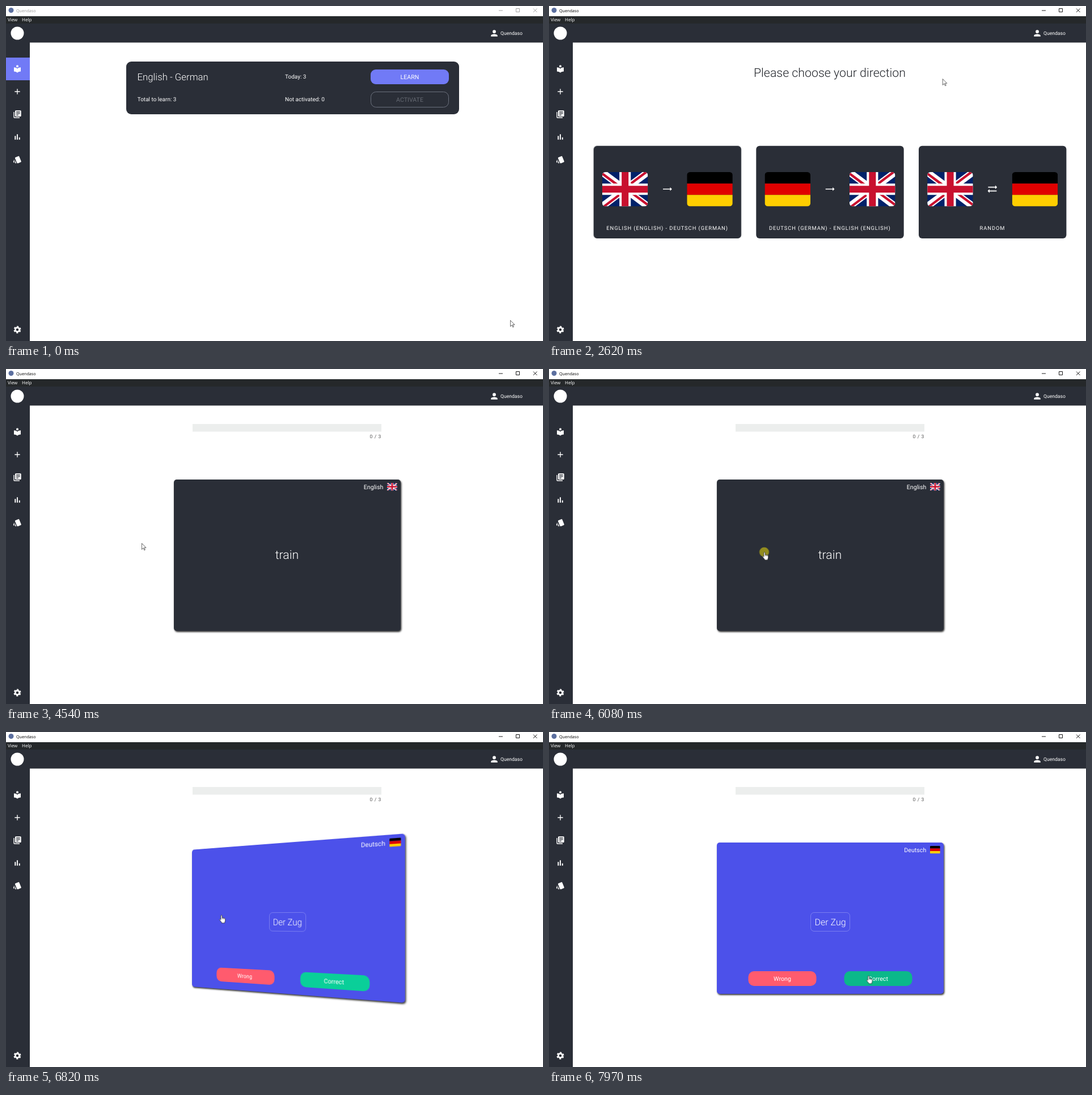
These frames come from a looping animation (947x591 px, 7.99 s). An HTML page:

```html
<!DOCTYPE html>
<html lang="en">
<head>
<meta charset="utf-8">
<title>Vocabulary trainer</title>
<style>
  html, body { margin: 0; width: 100%; height: 100%; overflow: hidden; background: #fff; }
  #stage { position: relative; width: 947px; height: 591px; overflow: hidden; }
  .layer { position: absolute; left: 0; top: 0; width: 947px; height: 591px; }
  svg { display: block; overflow: visible; }
  text { font-family: Roboto, sans-serif; font-size: 10px; fill: #fff; text-rendering: geometricPrecision; white-space: pre; }
  .ui text, text.ui { font-family: "Open Sans", sans-serif; font-size: 8px; }
  .mid { text-anchor: middle; }
  .end { text-anchor: end; }
  .btn { font-size: 10.67px; }
  .big { font-size: 21.33px; font-weight: 300; }
  .caption { font-size: 9.33px; letter-spacing: .95px; text-anchor: middle; }
  .dark { fill: #2a2e37; }
  .grow { transform-box: fill-box; transform-origin: center; }
  #deck { perspective: 700px; perspective-origin: 495.5px 328.25px; }
  #card { position: absolute; left: 295.5px; top: 195px; width: 400px; height: 266.5px; transform-style: preserve-3d; }
  .face { position: absolute; inset: 0; border-radius: 5px; backface-visibility: hidden;
          background: #2a2e37; box-shadow: 1.33px 2px 3px rgba(0, 0, 0, .8); }
  .back { background: #4c51ea; transform: rotateY(180deg); }
</style>
</head>
<body>
<div id="stage">

<svg class="layer" viewBox="0 0 947 591">
  <defs>
    <clipPath id="rounded"><rect width="640" height="480" rx="42"/></clipPath>
    <symbol id="uk" viewBox="0 0 640 480"><g clip-path="url(#rounded)">
      <path fill="#012169" d="M0 0h640v480H0z"/>
      <path fill="#fff" d="M75 0l244 181L562 0h78v62L400 241l240 178v61h-80L320 301 81 480H0v-60l239-178L0 64V0z"/>
      <path fill="#c8102e" d="M424 281l216 159v40L369 281zM240 301l6 35L54 480H0zM640 0v3L391 191l2-44L590 0zM0 0l239 176h-60L0 42z"/>
      <path fill="#fff" d="M241 0v480h160V0zM0 160v160h640V160z"/>
      <path fill="#c8102e" d="M0 193v96h640v-96zM273 0v480h96V0z"/>
    </g></symbol>
    <symbol id="de" viewBox="0 0 640 480"><g clip-path="url(#rounded)">
      <path d="M0 0h640v160H0z"/>
      <path fill="#e00000" d="M0 160h640v160H0z"/>
      <path fill="#ffce00" d="M0 320h640v160H0z"/>
    </g></symbol>
    <symbol id="oneWay" viewBox="0 0 24 24"><path fill="#fff" d="M22 12l-4-4v3H3v2h15v3z"/></symbol>
    <symbol id="bothWays" viewBox="0 0 24 24"><path fill="#fff" d="M22 8l-4-4v3H3v2h15v3zM2 16l4 4v-3h15v-2H6v-3z"/></symbol>
  </defs>

  <!-- window frame -->
  <circle cx="9" cy="7.5" r="4.5" fill="#5c6f9f"/>
  <g id="titleText">
    <text class="ui" x="18" y="11" style="font-size:7.2px;fill:currentColor">Quendaso</text>
    <path d="M869 8h7M899.5 4.5h6v6h-6zM930 4.5l6.5 6.5m0-6.5l-6.500 6.500" fill="none" stroke="currentColor" stroke-width=".9"/>
  </g>
  <path fill="#25282a" d="M0 18h947v13H0z"/>
  <g class="ui"><text x="3" y="27.3">View</text><text x="28" y="27.3">Help</text></g>
  <path class="dark" d="M0 31h947v33.500H42V591H0z"/>
  <circle cx="20" cy="48" r="11.5" fill="#fff"/>
  <path fill="#fff" transform="translate(852.4 39.4) scale(.72)" d="M12 12a4 4 0 1 0 0-8 4 4 0 0 0 0 8zm0 2c-2.700 0-8 1.300-8 4v2h16v-2c0-2.700-5.300-4-8-4z"/>
  <text x="872" y="51.3" style="font-size:8.6px">Quendaso</text>

  <!-- sidebar -->
  <rect id="activeNav" y="91" width="42" height="40" fill="#717af6"/>
  <g fill="#fff">
    <path transform="translate(12 102.8) scale(.667)" d="M12 11.5C9.600 9.300 6.500 8 3 8v11c3.500 0 6.600 1.300 9 3.500 2.400-2.200 5.500-3.500 9-3.500V8c-3.500 0-6.600 1.300-9 3.500zM12 8a3 3 0 1 0 0-6 3 3 0 0 0 0 6z"/>
    <path transform="translate(12 143) scale(.667)" d="M19 13h-6v6h-2v-6H5v-2h6V5h2v6h6z"/>
    <path transform="translate(12 183) scale(.667)" d="M4 6H2v14a2 2 0 0 0 2 2h14v-2H4zm16-4H8a2 2 0 0 0-2 2v12a2 2 0 0 0 2 2h12a2 2 0 0 0 2-2V4a2 2 0 0 0-2-2zm-1 9H9V9h10zm-4 4H9v-2h6zm4-8H9V5h10z"/>
    <path transform="translate(12 223) scale(.667)" d="M5 9.200h3V19H5zM10.600 5h2.800v14h-2.800zm5.600 8H19v6h-2.800z"/>
    <path transform="translate(12 263) scale(.667)" d="M2.500 19.700l1.400.5v-9l-2.500 5.800c-.4 1 .1 2.200 1.100 2.700zm19.500-3.700L17.100 4c-.4-1-1.600-1.500-2.600-1.100L7.100 6c-1 .4-1.500 1.500-1.100 2.600l5 12c.4 1 1.600 1.500 2.600 1.100l7.300-3.100c1-.4 1.500-1.600 1.100-2.600zM5.900 19.800a2 2 0 0 0 2 2h1.400l-3.400-8.400z"/>
  </g>
  <g transform="translate(20 571) scale(.667)" fill="none" stroke="#fff">
    <circle r="5.4" stroke-width="3.9"/>
    <circle r="8.2" stroke-width="3.2" stroke-dasharray="4.7 3.887" transform="rotate(14)"/>
  </g>
</svg>

<!-- overview -->
<svg class="layer" id="home" viewBox="0 0 947 591">
  <rect class="dark" x="212" y="98" width="587" height="93" rx="9"/>
  <text x="231.5" y="130.8" style="font-size:16.8px;font-weight:300">English - German</text>
  <text x="492" y="128">Today: 3</text>
  <text x="231.7" y="168">Total to learn: 3</text>
  <text x="492" y="168">Not activated: 0</text>
  <rect id="learn" x="643" y="112" width="138" height="26" rx="9" fill="#717af6"/>
  <text class="btn mid" x="712" y="128.8">LEARN</text>
  <rect x="643.5" y="151.5" width="137" height="27" rx="9" fill="none" stroke="#6b707d"/>
  <text class="btn mid" x="712" y="168.8" style="fill:#666a73">ACTIVATE</text>
</svg>

<!-- direction choice -->
<svg class="layer" id="choose" viewBox="0 0 947 591">
  <text class="big mid" x="495" y="124.7" style="fill:#22252b">Please choose your direction</text>
  <g id="choices"></g>
</svg>

<!-- exercise -->
<div class="layer" id="exercise">
  <svg class="layer" viewBox="0 0 947 591">
    <path fill="#eceeed" d="M329 97h333v13.500H329z"/>
    <text class="end" x="662" y="121.6" style="font-size:8.6px;letter-spacing:.6px;fill:#555">0 / 3</text>
  </svg>
  <div class="layer" id="deck">
    <div id="card">
      <div class="face"><svg width="400" height="266.5" viewBox="295.5 195 400 266.5">
        <text class="btn end" x="664.8" y="211.5">English</text>
        <use href="#uk" x="671.5" y="201" width="17.8" height="13.4"/>
        <text class="big mid" x="495" y="335.3">train</text>
      </svg></div>
      <div class="face back"><svg width="400" height="266.5" viewBox="295.5 195 400 266.5">
        <text class="btn end" x="664.8" y="211.5">Deutsch</text>
        <use href="#de" x="671.5" y="201" width="17.8" height="13.4"/>
        <rect x="461" y="318.5" width="69" height="33" rx="6" fill="none" stroke="#fff" stroke-opacity=".25"/>
        <text class="mid" x="495.5" y="340.8" style="font-size:16px;font-weight:300">Der Zug</text>
        <rect x="351" y="422" width="120" height="26" rx="10" fill="#ff5b6e"/>
        <text class="btn mid" x="411" y="438.5">Wrong</text>
        <rect id="correct" x="520" y="422" width="120" height="26" rx="10" fill="#0acf99"/>
        <text class="btn mid" x="580" y="438.5">Correct</text>
      </svg></div>
    </div>
  </div>
</div>

<!-- pointer -->
<svg class="layer" viewBox="0 0 947 591">
  <g id="pointer">
    <circle id="click" r="8.5" fill="#faea08" fill-opacity=".5"/>
    <g fill="#fff" stroke="#111" stroke-linejoin="round">
      <path id="arrow" transform="scale(.667)" d="M.6.8V17l3.900-3.700L7.300 19l2.300-1-2.800-5.600H12z"/>
      <g id="hand"><g transform="translate(-3.5 -.6) scale(.667)">
        <path d="M6 1c1 0 1.700.8 1.700 1.800v5l5.500 1c1.800.4 2.800 1.400 2.800 3v4l-1.500 4.500v1.500h-8v-1.500L1 13.500c-.6-1 .2-2.300 1.600-1.800l1.700 1.500V2.800C4.300 1.800 5 1 6 1z"/>
        <path d="M7.700 8v3.500M10.500 8.600v3M13.200 9v3" fill="none" stroke-width=".8"/>
      </g></g>
    </g>
  </g>
</svg>
</div>

<script>
const LOOP = 7990;
const byId = id => document.getElementById(id);

const choices = [
  ['uk', 'oneWay', 'de', 'ENGLISH (ENGLISH) - DEUTSCH (GERMAN)'],
  ['de', 'oneWay', 'uk', 'DEUTSCH (GERMAN) - ENGLISH (ENGLISH)'],
  ['uk', 'bothWays', 'de', 'RANDOM']
];
byId('choices').innerHTML = choices.map(([from, icon, to, label], i) => `
  <g transform="translate(${78.6 + i * 286.7} 246.7)">
    <rect class="dark grow" width="260.4" height="163.2" rx="6"/>
    <use href="#${from}" x="15.2" y="46.3" width="80.5" height="60.4"/>
    <use href="#${icon}" x="119.9" y="66.3" width="20" height="20"/>
    <use href="#${to}" x="164.7" y="46.3" width="80.5" height="60.4"/>
    <text class="caption" x="130" y="148">${label}</text>
  </g>`).join('');

// Each step is [time, value, easing towards the next step]; without an easing the value is held.
function track(target, prop, steps) {
  const el = typeof target === 'string' ? byId(target) : target;
  const frames = steps.map(([time, value, easing = 'steps(1)']) =>
    ({ offset: time / LOOP, [prop]: value, easing }));
  frames.push({ offset: 1, [prop]: steps[steps.length - 1][1] });
  el.animate(frames, { duration: LOOP, iterations: Infinity });
}

// Toggles visibility at the given times, starting from `on`.
const toggle = (id, on, ...times) =>
  track(id, 'opacity', [0, ...times].map((time, i) => [time, (i % 2 === 0) === on ? 1 : 0]));

toggle('home', true, 1840);
toggle('choose', false, 1840, 4160);
toggle('exercise', false, 4160);
toggle('deck', false, 4540);
toggle('click', false, 1700, 1840, 3970, 4160, 6080, 6240);
const shapeChanges = [820, 1940, 3450, 4280, 5520];
toggle('arrow', true, ...shapeChanges);
toggle('hand', false, ...shapeChanges);

track('titleText', 'color', [[0, '#999'], [1700, '#000']]);
track('activeNav', 'opacity', [[0, 1], [1840, 1, 'ease'], [2140, 0]]);
track('learn', 'fill', [[0, '#717af6'], [820, '#717af6', 'ease'], [1060, '#565cef']]);
track('correct', 'fill', [[0, '#0acf99'], [7840, '#0acf99', 'ease'], [7970, '#0bb88a']]);
track(document.querySelector('.grow'), 'transform',
  [[0, 'scale(1)'], [3450, 'scale(1)', 'ease'], [3700, 'scale(1.052, 1.084)']]);
track('card', 'transform',
  [[0, 'rotateY(0deg)'], [6230, 'rotateY(0deg)', 'ease'], [7230, 'rotateY(180deg)']]);

track('pointer', 'transform', [
  [0, 889, 554], [20, 889, 554, 'cubic-bezier(.45, 0, .6, .93)'],
  [800, 731, 136, 'ease-out'], [1090, 724, 120.5],
  [2360, 724, 120.5, 'ease-in'], [2620, 694, 128, 'cubic-bezier(.35, .15, .6, .93)'],
  [3430, 270, 271, 'ease-out'], [3700, 239, 307],
  [5290, 239, 307, 'ease-in-out'], [5810, 379.5, 323],
  [7080, 379.5, 323, 'cubic-bezier(.45, 0, .6, .93)'],
  [7840, 550, 422, 'ease-out'], [7970, 563, 430]
].map(([time, x, y, easing]) => [time, `translate(${x}px, ${y}px)`, easing]));
</script>
</body>
</html>
```
